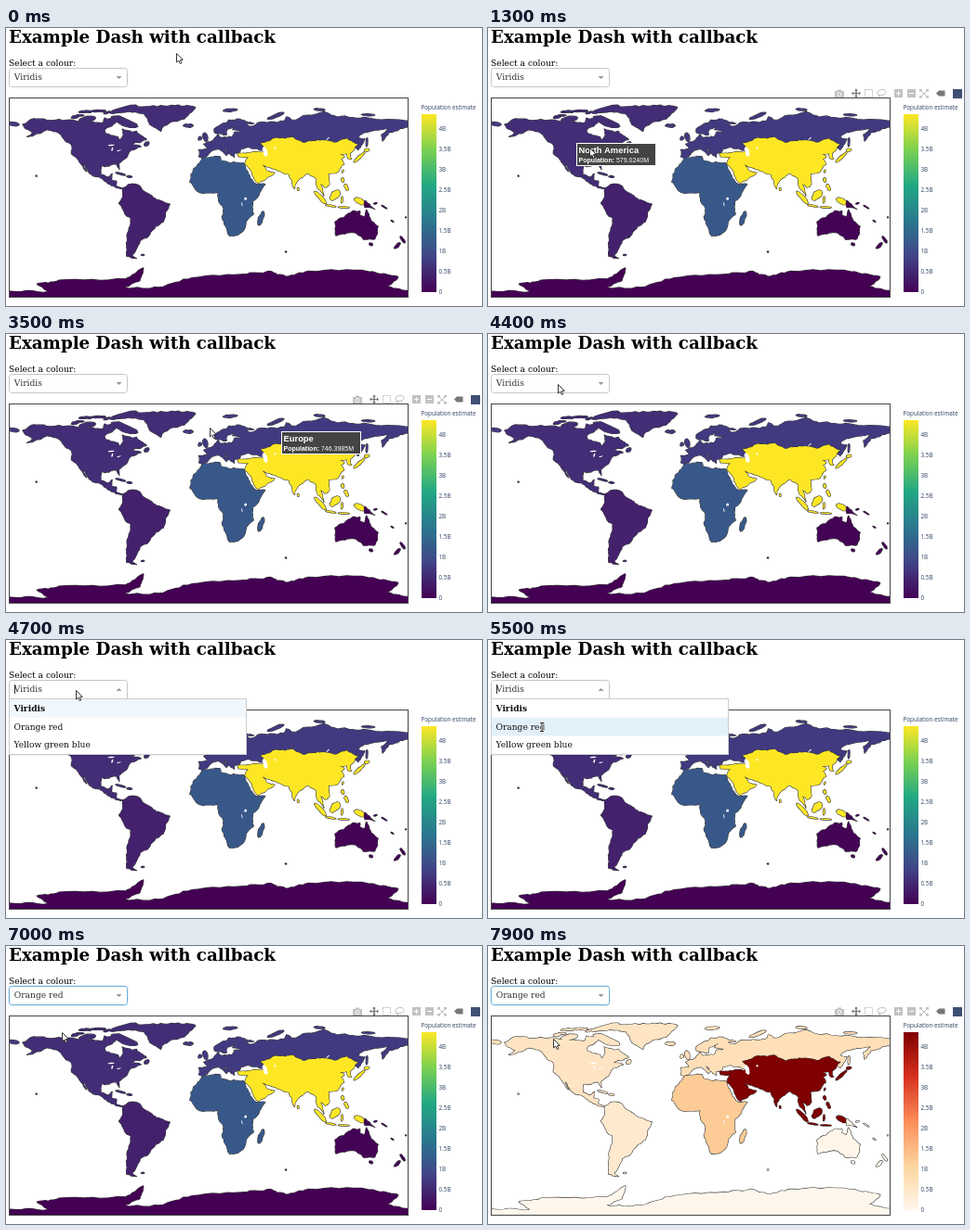
An HTML page with a canvas that plays this animation: 512 by 300 pixels, repeating every 8000 ms.

```html
<!DOCTYPE html>
<html lang="en">
<head>
<meta charset="utf-8">
<title>Example Dash with callback</title>
<style>
html,body{margin:0;width:100%;height:100%;overflow:hidden;background:#fff}
canvas{display:block;width:512px;height:300px}
</style>
</head>
<body>
<canvas id="c" width="512" height="300"></canvas>
<script>
const ctx = document.getElementById('c').getContext('2d');
const LOOP = 8000, STEP = 100;
const SERIF = '"DejaVu Serif","Noto Serif",serif';
const BODY = '9.125px ' + SERIF;
const SANS = '6.3px "Open Sans",sans-serif';
const ARIAL = '"Liberation Sans",Arial,sans-serif';

// pop: billions; coasts: key points as lon,lat; isles: two ends and a half-width
const LAND = [
  {pop: .579, coasts: [
    '-168,66 -156,71 -128,70 -108,68 -95,68 -94,72 -82,69.5 -87,65 -94,61 -93,58 -82,55 -80,51.5 -77,57 -78,62 -69,59 -65,60 -56,52.5 -66,50 -70,47.5 -61,46 -70,43 -76,35 -81,31 -80.5,25.3 -83,30 -97,28.5 -97.5,21 -91,18.5 -87,21.5 -88,16 -83.3,15 -83,10 -77.5,8.4 -85,10 -95,16 -105,20 -113,31 -110,23.5 -117,32.5 -124,40 -124,48 -135,58 -147,61 -164,55 -158,59 -165,62',
    '-73,78 -60,82 -33,83.5 -12,81.5 -22,71 -40,65 -43,60 -53,66 -58,75.5'],
  isles: ['-64,64 -88,73 3.2', '-64,82.5 -88,77 2.5', '-117,70 -102,72 2.3', '-124,72 -117,74 1.4', '-58,47 -54,50 1.6', '-84,22.5 -75,20.3 .7', '-74,19 -69,18.7 .8', '-156,20 -155,19.3 .5']},
  {pop: .422, coasts: [
    '-77.5,8.4 -72,12 -62,10.5 -50,0 -44,-2.6 -35,-6 -39,-13 -41,-22 -48,-26 -57,-36.5 -62,-39 -66,-48 -69,-52 -65,-55 -74,-53 -73.5,-37 -70.3,-18.5 -76,-14 -81,-5 -77.5,4'],
  isles: ['-61,-52 -58,-51.7 .5']},
  {pop: 1.216, coasts: [
    '-6,36 10,37.2 11,33.5 20,31 32,31 37,20 43,12 51,12 40,-3 40.5,-15 35,-20 32.5,-28 26,-34 19,-34.6 12,-17 13.5,-10 9,-1 9,4.5 -8,4.5 -17,14 -16,21 -10,30'],
  isles: ['45,-25 49.5,-12.5 2']},
  {pop: .7464, coasts: [
    '-5.6,36 -9,37 -9,43.3 -1.5,43.5 -4.5,48.3 5,53 8.5,57 11,54 21,55 23,59 30,60 21.5,61.5 25,65.5 17,62 16,56.5 5,59 5,62 18,70 28,71 41,67 33,66.5 40,64.5 44,67.5 68,69 70,73 75,70 104,77.5 113,74 140,72.5 183,69 183,65 163,59 157,51 156,57 163,62 143,59 135,54.5 141,53 135,43 122,50 60,50 50,42 37,45.5 33.5,45 29,44 28,41 23,40 23,36.5 13.5,45.5 18,40 16,38 9,44 3,42.5 -2,37'],
  isles: ['-182,67 -171,66 1.7', '-2,50.7 -4,58.5 2', '-9,52 -7,55 1.4', '-23,65 -14,65 1.5', '13,78.5 26,79.5 1.3', '53,71 68,76.7 1.4', '95,80 105,79 1', '138,75 150,74.5 .8', '142.5,46 143,54 .8']},
  {pop: 4.374, coasts: [
    '26,40 41,41.5 49,41 50,46 47,49 61,54 77,54 87,49.5 98,52 116,50 125,53.3 135,48.4 131,42.7 127.5,39.8 129,35 126.5,35 124.5,40 118,39 122.5,37 119.3,35 122,30 117,23.5 108,21.5 109,12 105,9 100.5,13 104,1.5 98.5,8 97.5,16.5 90,22 80,15 77.5,8 72.7,21 57,26.5 48.5,30 52,24.2 59.5,22.5 45,13 35,28.5 33,30 36,36.5 27,37'],
  isles: ['131,32 141,41 1.2', '140.5,42.5 145,43.5 1.2', '120.5,22.5 121.5,25 .5', '80.5,9 81,6.3 .8', '95.5,5.5 106,-5.5 1.7', '105.5,-6.7 115,-8.3 .7', '110,-2 118,6 3.2', '120,-5 120.5,1 .8', '120.6,18 121.5,14 1.2', '123,12 125.7,6.5 1.3', '131.5,-1 141,-6 2.3', '117,-8.7 127,-9 .5']},
  {pop: .04, coasts: [
    '114,-22 122,-18 130,-12 136.5,-12 136,-15.5 140.5,-17.5 142.5,-11 146,-19 153,-26 150,-37.5 140,-38 135,-34 131,-31.5 115,-34.5',
    '141,-2.6 150,-10.5 141,-9'],
  isles: ['145,-41.3 148,-43 1.1', '173,-35 177,-41 1.2', '173,-41 167.5,-46 1.3', '149,-5.6 152,-4.8 .6', '156,-7 161,-10 .5', '164.5,-20.5 167,-22 .4', '177.5,-18 178.5,-17.7 .5']},
  {pop: 0, coasts: [
    '-183,-84.6 -145,-85 -155,-78 -135,-74.5 -75,-73.5 -59,-63.5 -62,-75 -76,-81 -45,-81 -15,-72.5 35,-69 55,-66.5 69,-71 90,-66.5 145,-67 171,-71.5 161,-80 183,-84.6 183,-93 -183,-93'],
  isles: ['69,-49 70.3,-49 .5']}
];
const LAKES = ['49.5,46 52.5,37 2', '-91,47 -85,47.5 .6', '-87.5,42 -86.5,45.5 .6', '-83,42 -79,43 .4', '32,-1 34.5,-1 1.2', '29.5,-4 30.5,-8 .4', '59,45 61,45 .8', '106,52 109,54.5 .5'];
const MAX = 4.374;

const stops = s => s.split(' ').map(h => [0, 2, 4].map(i => parseInt(h.substr(i, 2), 16)));
const VIRIDIS = stops('440154 414487 2a788e 22a884 7ad151 fde725');
const ORRD = stops('fff7ec fdd49e fc8d59 d7301f 7f0000');
function shade(scale, f) {
  const p = f * (scale.length - 1), i = Math.min(scale.length - 2, Math.floor(p));
  return `rgb(${scale[i].map((a, k) => Math.round(a + (scale[i + 1][k] - a) * (p - i)))})`;
}

let seed = 7;
const rand = () => (seed = seed * 16807 % 2147483647) / 2147483647;
const points = s => s.split(' ').map(p => p.split(',').map(Number));

// Moves the midpoints of long edges to make a ragged coast.
function roughen(pts) {
  return pts.flatMap((p, i) => {
    const q = pts[(i + 1) % pts.length], dx = q[0] - p[0], dy = q[1] - p[1], len = Math.hypot(dx, dy);
    if (len < 2.5) return [p];
    const k = (rand() - .5) * .28 * Math.min(1, 7 / len);
    return [p, [(p[0] + q[0]) / 2 - dy * k, (p[1] + q[1]) / 2 + dx * k]];
  });
}
function outline(pts) {
  const path = new Path2D();
  pts.forEach(([lon, lat]) => path.lineTo(218 + lon * 1.1917, 183 - lat * 1.1944));
  path.closePath();
  return path;
}
const coast = s => outline(roughen(roughen(roughen(points(s)))));

// A ragged ellipse stretched between two ends.
function isle(s) {
  const [[ax, ay], [bx, by], [w]] = points(s), dx = (bx - ax) / 2, dy = (by - ay) / 2, len = Math.hypot(dx, dy);
  return outline(Array.from({length: 12}, (_, i) => {
    const a = i / 6 * Math.PI, u = Math.cos(a), v = Math.sin(a) * w / len * (.75 + rand() * .5);
    return [ax + dx + dx * u - dy * v, ay + dy + dy * u + dx * v];
  }));
}
// Scattered Arctic islands
for (let i = 0; i < 12; i++) {
  const lon = -120 + i * 2.8, lat = 74 + rand() * 4.5;
  LAND[0].isles.push(`${lon},${lat} ${lon + 3 + rand() * 5},${lat + rand()} ${.5 + rand() * .5}`);
}
const SHAPES = LAND.map(l => ({pop: l.pop, paths: [...l.coasts.map(coast), ...l.isles.map(isle)]}));
const WATER = LAKES.map(isle);

function text(s, x, y, font, color) {
  ctx.font = font;
  ctx.fillStyle = color;
  ctx.fillText(s, x, y);
}
function rect(x, y, w, h, color) {
  ctx.fillStyle = color;
  ctx.fillRect(x, y, w, h);
}
function poly(pts, fill, stroke, width = 1) {
  ctx.beginPath();
  pts.forEach(p => ctx.lineTo(...p));
  ctx.closePath();
  if (fill) { ctx.fillStyle = fill; ctx.fill(); }
  if (stroke) { ctx.strokeStyle = stroke; ctx.lineWidth = width; ctx.stroke(); }
}

function drawMap(scale) {
  ctx.save();
  ctx.beginPath();
  ctx.rect(4, 76, 428, 214);
  ctx.clip();
  ctx.lineJoin = 'round';
  ctx.strokeStyle = '#383838';
  ctx.lineWidth = 1.2;
  for (const {pop, paths} of SHAPES) {
    paths.forEach(p => ctx.stroke(p));
    ctx.fillStyle = shade(scale, pop / MAX);
    paths.forEach(p => ctx.fill(p));
  }
  ctx.fillStyle = '#fff';
  WATER.forEach(p => ctx.fill(p));
  ctx.restore();
  ctx.strokeStyle = '#444';
  ctx.lineWidth = 1;
  ctx.strokeRect(3.5, 75.5, 429, 215);
}

function drawBar(scale) {
  const g = ctx.createLinearGradient(0, 285, 0, 93);
  scale.forEach((_, i) => g.addColorStop(i / (scale.length - 1), shade(scale, i / (scale.length - 1))));
  rect(447, 93, 16, 192, g);
  text('Population estimate', 446.5, 87.5, SANS, '#2a3f5f');
  for (let v = 0; v <= 4; v += .5) text(v ? v + 'B' : '0', 465.5, 287.2 - v * 44, SANS, '#2a3f5f');
}

function drawModebar(alpha) {
  if (alpha <= 0) return;
  const pale = '#c2c2c2', dark = '#777';
  const line = (x1, y1, x2, y2, c, w = 1) => poly([[x1, y1], [x2, y2]], null, c, w);
  ctx.save();
  ctx.globalAlpha = alpha;
  rect(373, 68, 10, 7, pale);
  rect(376, 66.5, 4, 2, pale);
  ctx.strokeStyle = '#fff';
  ctx.beginPath(); ctx.arc(378, 71.5, 2, 0, 7); ctx.stroke();
  line(392, 70.5, 400, 70.5, dark);
  line(396, 66.5, 396, 74.5, dark);
  for (const [x, y] of [[1, 0], [-1, 0], [0, 1], [0, -1]])
    poly([[396 + x * 5, 70.5 + y * 5], [396 + x * 3 + y * 2, 70.5 + y * 3 + x * 2], [396 + x * 3 - y * 2, 70.5 + y * 3 - x * 2]], dark);
  ctx.strokeStyle = pale;
  ctx.setLineDash([2, 1]);
  ctx.strokeRect(405.5, 66.5, 8, 8);
  ctx.setLineDash([]);
  ctx.beginPath(); ctx.ellipse(423.5, 69.5, 4.5, 3, -.2, 0, 7); ctx.stroke();
  line(420, 71.5, 421.5, 75, pale);
  for (const x of [437, 451]) {
    rect(x, 66, 9, 9, pale);
    rect(x + 2, 70, 5, 1, '#fff');
  }
  rect(441, 68, 1, 5, '#fff');
  line(465, 67, 473, 75, pale);
  line(473, 67, 465, 75, pale);
  for (const x of [464, 471]) for (const y of [66, 73]) rect(x, y, 3, 2.5, pale);
  poly([[482, 70.5], [485, 67.5], [491.5, 67.5], [491.5, 73.5], [485, 73.5]], dark);
  rect(500, 66, 10, 10, '#3f4f75');
  ctx.restore();
}

function drawTip({x, y, name, value}) {
  rect(x, y, 86, 25, '#fff');
  rect(x + 1, y + 1, 84, 23, '#444');
  text(name, x + 2.5, y + 11.2, 'bold 9.4px ' + ARIAL, '#fff');
  text('Population:', x + 2.5, y + 21, 'bold 7px ' + ARIAL, '#fff');
  const w = ctx.measureText('Population:').width;
  text(' ' + value, x + 2.5 + w, y + 21, '7px ' + ARIAL, '#fff');
}

function drawSelect(value, open, focus) {
  ctx.beginPath();
  ctx.roundRect(3.5, 43.5, 127, 20, open ? [3, 3, 0, 0] : 3);
  if (focus) { ctx.lineWidth = 3; ctx.strokeStyle = '#e3f0f8'; ctx.stroke(); }
  ctx.fillStyle = '#fff';
  ctx.fill();
  ctx.lineWidth = 1;
  ctx.strokeStyle = focus ? '#6fb1d8' : '#c6c6c6';
  ctx.stroke();
  text(value, 8.8, 56, BODY, '#333');
  const [base, tip] = open ? [55, 52] : [52, 55];
  poly([[118.5, base], [124.5, base], [121.5, tip]], '#999');
  if (open) rect(9, 48, 1, 10, '#333');
}

function drawMenu(active) {
  const row = 19.7;
  rect(3, 64, 256, 61, 'rgba(0,0,0,.06)');
  rect(3, 63, 256, 61, '#ccc');
  rect(4, 64, 254, 59, '#fff');
  rect(4, 64 + active * row, 254, row, active ? '#e2f0fa' : '#f0f7fd');
  ['Viridis', 'Orange red', 'Yellow green blue'].forEach((s, i) =>
    text(s, 8.5, 77 + i * row, (i ? '' : 'bold ') + BODY, '#111'));
}

function drawArrow(x, y) {
  const pts = [[0, 0], [0, 9.5], [2.2, 7.5], [3.8, 11], [5.4, 10.3], [3.9, 7], [6.8, 6.8]];
  poly(pts.map(([a, b]) => [x + .5 + a, y + .5 + b]), '#fff', '#222', .9);
}
function drawBeam(x, y) {
  for (const [w, c] of [[2.6, '#fff'], [1, '#222']]) {
    ctx.strokeStyle = c;
    ctx.lineWidth = w;
    ctx.beginPath();
    for (const e of [-4.5, 4.5]) { ctx.moveTo(x - 2, y + e); ctx.lineTo(x + 2, y + e); }
    ctx.moveTo(x, y - 4.5); ctx.lineTo(x, y + 4.5);
    ctx.stroke();
  }
}

// Pointer legs: first step, last step, end x, end y, bend x, bend y
const LEGS = [
  [800, 1100, 107, 125, 0, 0], [1300, 1300, 109, 129, 0, 0], [1600, 2100, 243, 123, 0, 56], [2700, 2700, 244, 124, 0, 0],
  [2900, 3100, 274, 151, 0, 0], [3400, 3600, 192, 87, 0, -16], [3900, 4400, 75, 54, 0, -62],
  [5300, 5800, 58, 97, -18, 36], [6200, 6200, 59, 95, 0, 0], [6700, 7100, 60, 93, 0, 0], [7900, 7900, 70, 100, 0, 0]
];
function pointer(t) {
  let x = 183, y = 27;
  for (const [start, end, ex, ey, bx, by] of LEGS) {
    if (t < start) break;
    const p = Math.min(1, (t - start + STEP) / (end - start + STEP)), b = 2 * p * (1 - p);
    x += (ex - x) * p + bx * b;
    y += (ey - y) * p + by * b;
  }
  return [Math.round(x), Math.round(y)];
}

const AMERICA = {x: 95, y: 124, name: 'North America', value: '579.0240M'};
const EUROPE = {x: 296, y: 105, name: 'Europe', value: '746.3985M'};
const ASIA = {x: 312, y: 143, name: 'Asia', value: '4.373914B'};
function hovered(t) {
  if (t >= 1000 && t < 1700) return AMERICA;
  if (t >= 2900 && t < 3400) return ASIA;
  if (t >= 1900 && t < 3600) return EUROPE;
}

const fade = (t, start) => Math.max(0, Math.min(1, (t - start) / 300));

function draw(t) {
  const scale = t >= 7100 ? ORRD : VIRIDIS;
  const picked = t >= 6700, open = t >= 4700 && !picked, onOption = t >= 5400 && !picked;
  const tip = hovered(t);
  rect(0, 0, 512, 300, '#fff');
  text('Example Dash with callback', 3, 15.5, 'bold 18.25px ' + SERIF, '#000');
  text('Select a colour:', 3, 41, BODY, '#000');
  drawMap(scale);
  drawBar(scale);
  drawModebar(fade(t, 800) - fade(t, 3900) + fade(t, 6700));
  if (tip) drawTip(tip);
  drawSelect(picked ? 'Orange red' : 'Viridis', open, picked);
  if (open) drawMenu(onOption ? 1 : 0);
  (onOption ? drawBeam : drawArrow)(...pointer(t));
}

let last = -1;
function tick() {
  const t = Math.floor(performance.now() % LOOP / STEP) * STEP;
  if (t !== last) draw(last = t);
  requestAnimationFrame(tick);
}
draw(0);
tick();
</script>
</body>
</html>
```
